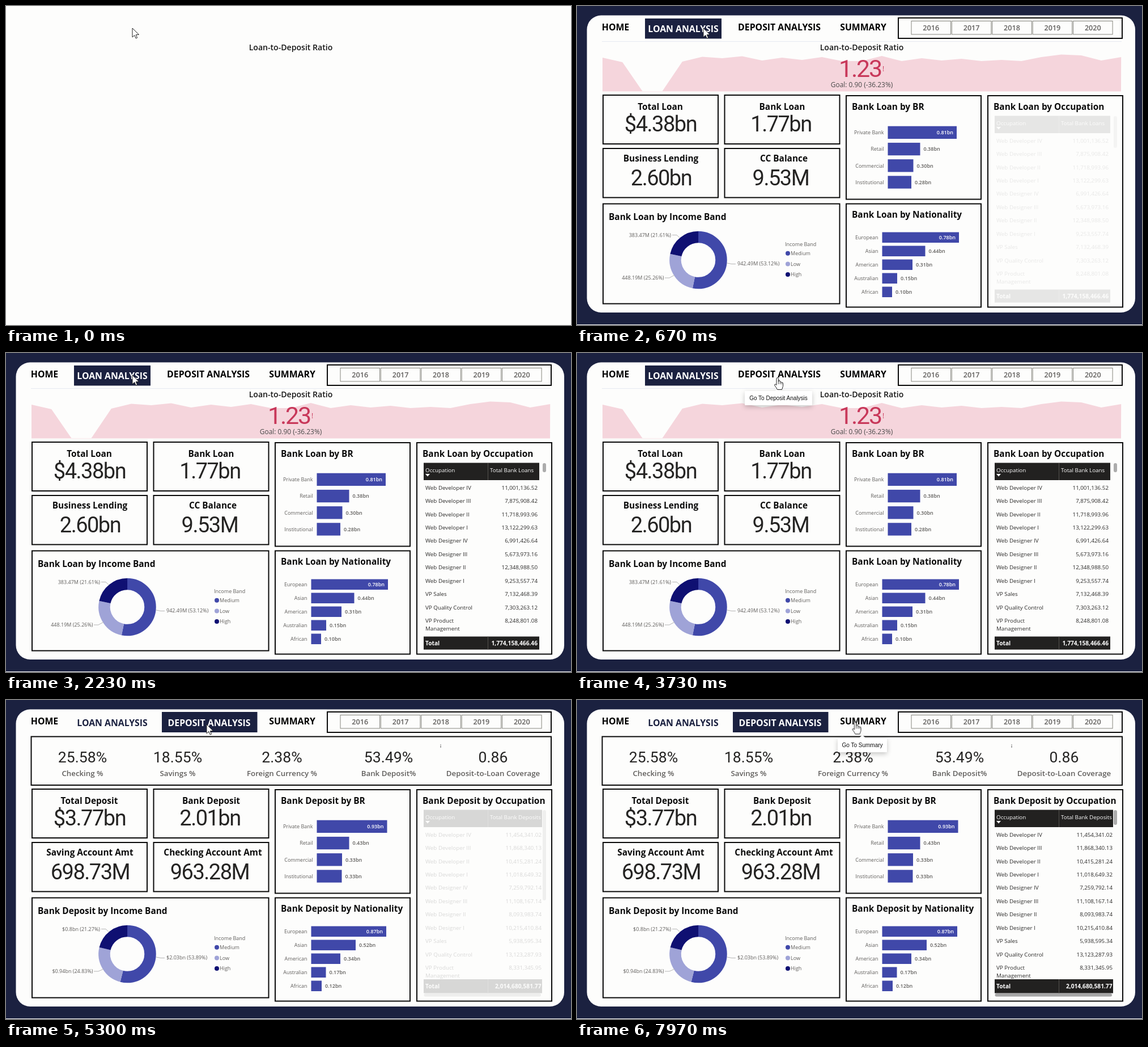
Write an HTML page that moves like this. It is 997 by 562 pixels and loops after 8 s.

```html
<!DOCTYPE html>
<html lang="en">
<head>
<meta charset="utf-8">
<title>Bank dashboard</title>
<style>
html, body { margin: 0; width: 100%; height: 100%; overflow: hidden; background: #fdfdfc; }
svg { display: block; width: 100vw; height: 100vh; }
text { font-family: "Open Sans", "Noto Sans", sans-serif; white-space: pre; }
.nav { font-weight: 700; font-size: 15.8px; }
.head { font-weight: 700; font-size: 15.4px; fill: #0c0c0c; }
.big, .ratio, .rate { font-family: Roboto, "Liberation Sans", sans-serif; fill: #252423; }
.big { font-size: 38px; letter-spacing: -1.5px; }
.ratio { font-size: 43px; letter-spacing: -2.2px; fill: #c8385a; }
.rate { font-size: 26.6px; }
.rateName { font-size: 13.3px; font-weight: 600; fill: #605e5c; }
.year { font-size: 12.6px; font-weight: 600; fill: #605e5c; }
.title { font-size: 14.1px; font-weight: 600; fill: #161616; }
.goal { font-size: 11.9px; fill: #4a4a4a; }
.small { font-size: 9px; fill: #605e5c; }
.bar { font-size: 9px; font-weight: 600; fill: #605e5c; }
.cell { font-size: 9.8px; fill: #2b2a29; }
.sum { font-size: 10.2px; font-weight: 700; }
.tip { font: 10px "Liberation Sans", Arial, sans-serif; fill: #111; }
.white { fill: #fff; }

.step, .fade { animation-duration: 8s; animation-iteration-count: infinite; }
.step { animation-timing-function: step-end; }
.fade { animation-timing-function: linear; }
.loan { animation-name: loan; }
.deposit { animation-name: deposit; }
.loanFrame { animation-name: loanFrame; }
.kpi { animation-name: kpi; }
.loanCharts { animation-name: loanCharts; }
.loanTable { animation-name: loanTable; }
.depositCharts { animation-name: depositCharts; }
.depositTable { animation-name: depositTable; }
.loanThumb { animation-name: loanThumb; }
.depositThumb { animation-name: depositThumb; }
.loanTip { animation-name: loanTip; }
.depositTip { animation-name: depositTip; }
.hand { animation-name: hand; }
.arrow { animation-name: arrow; }
.cursor { animation: move 8s ease-in-out infinite; }

@keyframes loan { 0% { opacity: 1 } 54.62%, 100% { opacity: 0 } }
@keyframes deposit { 0% { opacity: 0 } 62.5%, 100% { opacity: 1 } }
@keyframes loanFrame { 0% { opacity: 0 } 4.125%, 100% { opacity: 1 } }
@keyframes kpi { 0%, 4.125% { opacity: 0 } 6.1%, 100% { opacity: 1 } }
@keyframes loanCharts { 0%, 5.69% { opacity: 0 } 8.1%, 100% { opacity: 1 } }
@keyframes loanTable { 0%, 8.1% { opacity: 0 } 11%, 100% { opacity: 1 } }
@keyframes depositCharts { 0%, 63% { opacity: 0 } 65.75%, 100% { opacity: 1 } }
@keyframes depositTable { 0%, 65.75% { opacity: 0 } 68.75%, 100% { opacity: 1 } }
@keyframes loanThumb { 0% { height: 56px } 20%, 100% { height: 16px } }
@keyframes depositThumb { 0% { height: 159px } 72%, 100% { height: 26px } }
@keyframes loanTip { 0% { opacity: 0 } 42% { opacity: 1 } 54.62%, 100% { opacity: 0 } }
@keyframes depositTip { 0% { opacity: 0 } 87.5%, 100% { opacity: 1 } }
@keyframes hand { 0% { opacity: 0 } 34.4% { opacity: 1 } 54.62% { opacity: 0 } 79.1%, 100% { opacity: 1 } }
@keyframes arrow { 0% { opacity: 1 } 34.4% { opacity: 0 } 54.62% { opacity: 1 } 79.1%, 100% { opacity: 0 } }
@keyframes move {
  0%, 31.25% { transform: translate(223px, 39px) }
  38.1%, 54.61% { transform: translate(354px, 44px) }
  54.62%, 73.75% { transform: translate(354px, 43px) }
  82%, 83% { transform: translate(487px, 41px) }
  85%, 100% { transform: translate(491.5px, 39.5px) }
}
</style>
</head>
<body>
<svg id="stage" viewBox="0 0 997 562" preserveAspectRatio="none">
  <defs>
    <filter id="shadow" x="-20%" y="-40%" width="140%" height="200%">
      <feDropShadow dx="0" dy="3" stdDeviation="4" flood-color="#000" flood-opacity=".22"/>
    </filter>
  </defs>
</svg>
<script>
const NAVY = '#1b2140', BLUE = '#4048a9', PALE = '#9fa3d7', DEEP = '#0f1072', DARK = '#222120';

const text = (x, y, s, cls, anchor = 'start', extra = '') =>
  `<text x="${x}" y="${y}" class="${cls}" text-anchor="${anchor}" ${extra}>${s}</text>`;
const rect = (x, y, x2, y2, fill, extra = '') =>
  `<rect x="${x}" y="${y}" width="${x2 - x}" height="${y2 - y}" fill="${fill}" ${extra}/>`;
const box = (x, y, x2, y2) => rect(x, y, x2, y2, 'none', 'stroke="#0a0a0a" stroke-width="2"');
const line = (points, color) => `<polyline points="${points}" fill="none" stroke="${color}"/>`;
const group = (cls, ...parts) => `<g class="${cls}">${parts.join('')}</g>`;

const pages = {
  loan: {
    word: 'Loan',
    cards: ['Total Loan', 'Bank Loan', 'Business Lending', 'CC Balance'],
    values: ['$4.38bn', '1.77bn', '2.60bn', '9.53M'],
    br: [[670, .81], [605.5, .38], [593.5, .30], [590, .28]],
    nation: [[674, .78], [614.5, .44], [592, .31], [565, .15], [556, .10]],
    shares: [53.12, 25.26, 21.61],
    notes: ['942.49M (53.12%)', '448.19M (25.26%)', '383.47M (21.61%)'],
    rows: ['11,001,136.52', '7,875,908.42', '11,718,993.96', '13,122,299.63', '6,991,426.64', '5,673,973.16',
      '12,348,988.50', '9,253,557.74', '7,132,468.39', '7,303,263.12', '8,248,801.08'],
    total: '1,774,158,466.46', edge: 941, right: 938, foot: [499.5, 522.5], sumRight: 938
  },
  deposit: {
    word: 'Deposit',
    cards: ['Total Deposit', 'Bank Deposit', 'Saving Account Amt', 'Checking Account Amt'],
    values: ['$3.77bn', '2.01bn', '698.73M', '963.28M'],
    br: [[672.5, .93], [605.5, .43], [593, .33], [592.5, .33]],
    nation: [[671, .87], [617, .52], [590, .34], [564.5, .17], [557, .12]],
    shares: [53.89, 24.83, 21.27],
    notes: ['$2.03bn (53.89%)', '$0.94bn (24.83%)', '$0.8bn (21.27%)'],
    rows: ['11,454,341.02', '11,868,340.13', '10,415,281.24', '11,018,649.32', '7,259,792.14', '11,108,167.14',
      '8,093,983.74', '10,215,410.84', '5,938,595.34', '13,123,287.93', '8,331,345.95'],
    total: '2,014,680,581.77', edge: 946, right: 945, foot: [492, 516.5], sumRight: 944.5
  }
};
const jobs = ['Web Developer IV', 'Web Developer III', 'Web Developer II', 'Web Developer I', 'Web Designer IV',
  'Web Designer III', 'Web Designer II', 'Web Designer I', 'VP Sales', 'VP Quality Control', 'VP Product'];

function frame(p) {
  const loan = p.word === 'Loan';
  const titleX = [147, 362, 148, 365];
  return [
    rect(0, 0, 997, 561, NAVY),
    rect(17.5, 16.5, 985, 540, '#fdfdfc', 'rx="25"'),
    loan ? rect(120, 22, 255, 57.5, NAVY) : rect(275, 21, 443.5, 57, NAVY),
    text(68, 43.3, 'HOME', 'nav', 'middle'),
    text(187.5, 45.5, 'LOAN ANALYSIS', 'nav', 'middle', `fill="${loan ? '#fff' : NAVY}"`),
    loan ? text(357, 43.3, 'DEPOSIT ANALYSIS', 'nav', 'middle')
      : text(358.5, 45.5, 'DEPOSIT ANALYSIS', 'nav white', 'middle'),
    text(505, 43.3, 'SUMMARY', 'nav', 'middle'),
    box(567, 21, 962, 57),
    loan ? line('44,62.5 961,62.5', '#e7e9f1') : box(44.5, 64.5, 962, 150),
    box(46, 157, 249, 243), box(260.5, 157, 463.5, 243),
    box(46, 251, 249, 337.5), box(260.5, 251, 463.5, 337.5),
    box(46, 348.5, 463.5, 524.5), box(475, 158, 713, 340.5),
    box(475, 348.5, 713, 530.5), box(725, 158, 963, 530.5),
    ...p.cards.map((s, i) => text(titleX[i], i < 2 ? 182.5 : 273.8, s, 'head', 'middle')),
    text(485, 182.5, `Bank ${p.word} by BR`, 'head'),
    text(735, 182.5, `Bank ${p.word} by Occupation`, 'head'),
    text(56, 376.8, `Bank ${p.word} by Income Band`, 'head'),
    text(485, 372.5, `Bank ${p.word} by Nationality`, 'head')
  ].join('');
}

function bars(x, y, step, h, names, data) {
  return names.map((name, i) => {
    const [end, value] = data[i], top = y + i * step, base = top + h / 2 + 3.3;
    const label = value.toFixed(2) + 'bn';
    return rect(x, top, end, top + h, BLUE) + text(x - 7, base, name, 'small', 'end') +
      (i ? text(end + 6, base, label, 'bar') : text(end - 6, base, label, 'bar white', 'end'));
  }).join('');
}

function donut(p) {
  const cx = 214, cy = 447.5, mid = 40.5, around = 2 * Math.PI * mid;
  let turn = 0;
  const arcs = [BLUE, PALE, DEEP].map((color, i) => {
    const part = p.shares[i] / 100;
    const arc = `<circle cx="${cx}" cy="${cy}" r="${mid}" fill="none" stroke="${color}" stroke-width="20.5"
      stroke-dasharray="${part * around} ${around}" transform="rotate(${turn * 360 - 90} ${cx} ${cy})"/>`;
    turn += part;
    return arc;
  });
  const legend = ['Medium', 'Low', 'High'].map((s, i) =>
    `<circle cx="372" cy="${435.7 + i * 18.7}" r="4" fill="${[BLUE, PALE, DEEP][i]}"/>` +
    text(377, 439 + i * 18.7, s, 'small', 'start', 'font-weight="500"'));
  const lowY = p.word === 'Loan' ? 479 : 478;
  return [
    ...arcs, ...legend,
    text(367, 423.3, 'Income Band', 'small'),
    line('265,453 273,454.5 280,454.5', '#b5b5b5'),
    line(`155,${lowY} 163,${lowY} 172,474`, '#b5b5b5'),
    line('168,403.5 176,403.5 182,409', '#b5b5b5'),
    text(283, 457.3, p.notes[0], 'small'),
    text(153.5, lowY + 3.3, p.notes[1], 'small', 'end'),
    text(166, 406.8, p.notes[2], 'small', 'end')
  ].join('');
}

function charts(p) {
  const valueX = [147.5, 360, 148.5, 359.5];
  const years = [0, 1, 2, 3, 4].map(i => {
    const x = 590 + i * 71.4;
    return rect(x, 26.5, x + 69.5, 50, 'none', 'stroke="#85857e"') + text(x + 34.7, 43, 2016 + i, 'year', 'middle');
  });
  return [
    ...years,
    ...p.values.map((s, i) => text(valueX[i], i < 2 ? 221 : 316, s, 'big', 'middle')),
    bars(548.5, 211.7, 29.2, 22.3, ['Private Bank', 'Retail', 'Commercial', 'Institutional'], p.br),
    bars(538.5, 398.5, 24, 18.5, ['European', 'Asian', 'American', 'Australian', 'African'], p.nation),
    donut(p)
  ].join('');
}

function table(p, thumb) {
  const [top, bottom] = p.foot, base = (top + bottom) / 2 + 4, loan = p.word === 'Loan';
  return [
    rect(737, 193.5, p.edge, 224, DARK),
    line('850.5,194 850.5,224', '#55534f'),
    text(740, 210, 'Occupation', 'cell white'),
    '<path d="M740 213h8l-4 4.5z" fill="#fff"/>',
    text(854, 210, `Total Bank ${p.word}s`, 'cell white'),
    ...p.rows.map((v, i) => {
      const y = 240.8 + i * 23.42;
      return text(740, y, jobs[i], 'cell') + text(p.right, y, v, 'cell', 'end');
    }),
    text(740, 488.8, 'Management', 'cell'),
    rect(737, top, p.edge, bottom, DARK),
    line(`850.5,${top} 850.5,${bottom}`, '#55534f'),
    text(740, base, 'Total', 'sum white'),
    text(p.sumRight, base, p.total, 'sum white', 'end'),
    rect(947, 194, 953, 250, '#acacac', `rx="3" class="step ${thumb}"`),
    loan ? '' : rect(737.5, 517, 944, 522.5, '#a6a6a6', 'rx="2.7"')
  ].join('');
}

// Monthly trend behind the ratio, evenly spaced
const trend = [91, 99, 150, 150, 98, 89.5, 92, 88.5, 96, 91, 95, 90, 97, 97, 88, 97, 92, 96, 93, 97, 95, 97, 90, 85.5, 87, 96, 90];
const area = trend.map((y, i) => `${45 + i * 35.2},${y}`).join(' ');
const kpi = `<polygon points="${area} 960,150.5 45,150.5" fill="#f5d5dc"/>` +
  text(499.5, 125, '1.23', 'ratio', 'middle') +
  text(539, 115, '!', 'goal', 'start', 'style="fill:#c8385a"') +
  text(502.5, 143, 'Goal: 0.90 (-36.23%)', 'goal', 'middle');

const rates = [[135, '25.58%', 'Checking %'], [303, '18.55%', 'Savings %'], [487, '2.38%', 'Foreign Currency %'],
  [675, '53.49%', 'Bank Deposit%'], [859.5, '0.86', 'Deposit-to-Loan Coverage']]
  .map(([x, v, s]) => text(x, 110, v, 'rate', 'middle') + text(x, 134, s, 'rateName', 'middle')).join('') +
  rect(766.5, 78, 767.5, 79.3, '#555') + rect(766.5, 80.3, 767.5, 84, '#555');

const tip = (x, x2, s) => {
  const mid = (x + x2) / 2;
  return `<g filter="url(#shadow)">${rect(x, 67, x2, 92, '#fff', 'rx="1.5"')}
    <path d="M${mid - 6} 67.2l6-5.5 6 5.5z" fill="#fff"/></g>` + text(mid, 83, s, 'tip', 'middle');
};

const arrow = '<path d="M0 0V16L3.8 12.5 6.2 18 8.6 17 6.3 11.7 11.5 11.4Z" fill="#fff" stroke="#222"/>';
const hand = `<path d="M-2 1.5Q-2-.5-.3-.5 1.4-.5 1.4 1.5V7Q3-.0 4.4 7.3 6 5.8 7 8 9.5 7 9.5 10V14.5L7.5 20.5H-.5
  Q-1.5 17.5-5.3 13 -5.6 10.5-3.4 11L-2 12.5Z" fill="#fff" stroke="#222" stroke-linejoin="round"/>
  <path d="M1.4 7v4M4.4 7.5V11M7 8.3v3" stroke="#222" stroke-width=".8"/>`;

const { loan, deposit } = pages;
document.getElementById('stage').insertAdjacentHTML('beforeend', [
  rect(0, 0, 997, 562, '#fdfdfc'),
  group('step loan',
    group('step loanFrame', frame(loan)),
    group('fade kpi', kpi),
    text(502.5, 78, 'Loan-to-Deposit Ratio', 'title', 'middle'),
    group('fade loanCharts', charts(loan)),
    group('fade loanTable', table(loan, 'loanThumb'))),
  group('step deposit',
    frame(deposit),
    group('fade depositCharts', rates, charts(deposit)),
    group('fade depositTable', table(deposit, 'depositThumb'))),
  group('step loanTip', tip(296, 415, 'Go To Deposit Analysis')),
  group('step depositTip', tip(460, 547, 'Go To Summary')),
  group('cursor', group('step arrow', arrow), group('step hand', hand))
].join(''));
</script>
</body>
</html>
```
